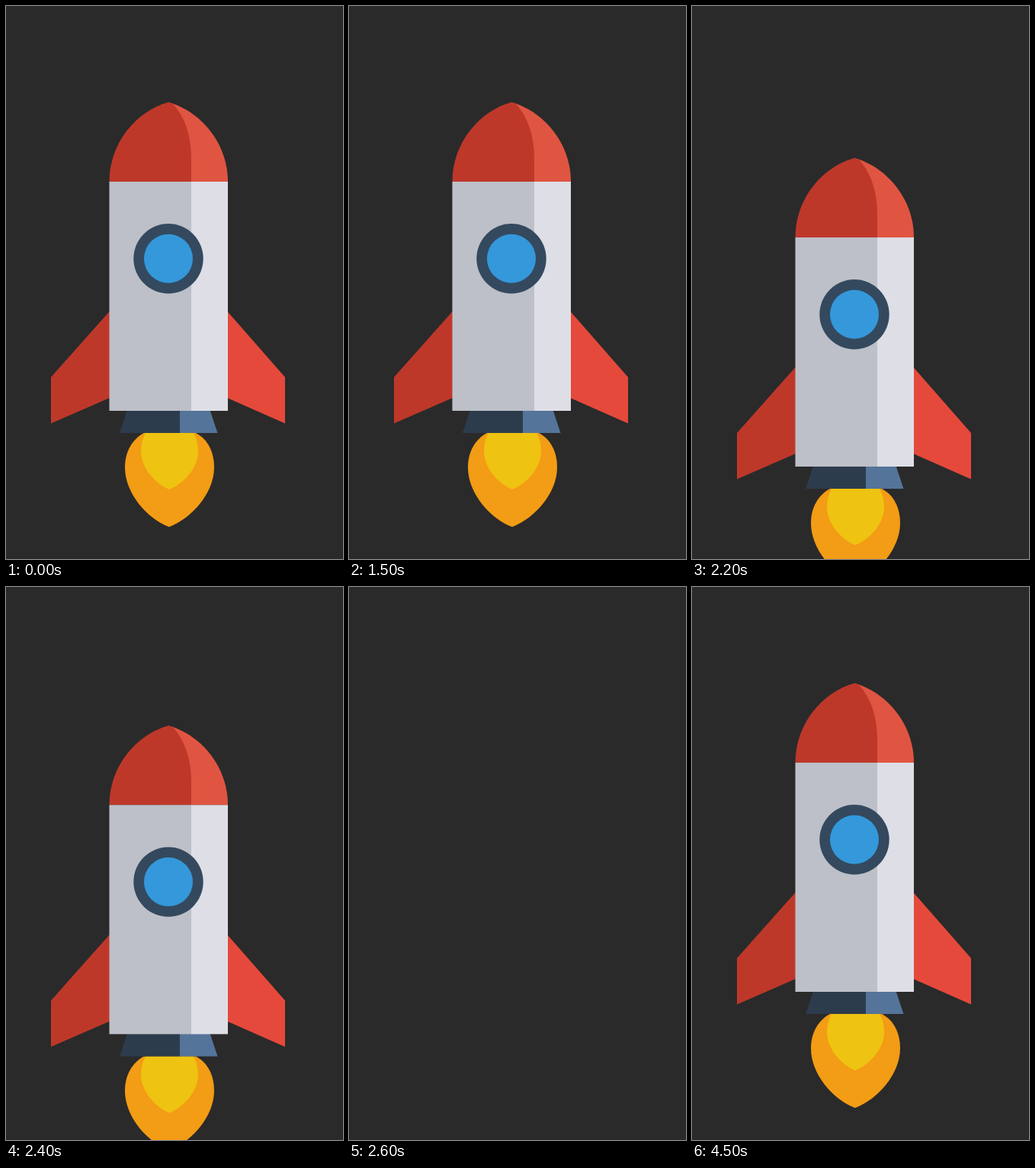
Write an HTML page that moves like this. It is 442 px wide and 724 px high and loops after 5.3 s.

```html
<!DOCTYPE html>
<html lang="en">
<head>
<meta charset="utf-8">
<title>Rocket launch</title>
<style>
  html, body { margin: 0; width: 100%; height: 100%; overflow: hidden; background: #2a2a2a; }
  svg { display: block; width: 100%; height: 100%; }
</style>
</head>
<body>
<svg viewBox="0 0 442 724">
  <rect width="442" height="724" fill="#2a2a2a"/>
  <rect y="720" width="442" height="4" fill="#2b292b"/>
  <g id="rocket">
    <g id="flame">
      <path fill="#f39c15" d="M181 559C166 567 156 583 156 604C156 638 185 671 214 682C243 671 273 638 273 604C273 583 264 567 249 559Z"/>
      <path fill="#efc311" d="M183 559C179 566 177 574 177 583C177 604 195 625 214 633C234 625 252 604 252 583C252 574 250 566 246 559Z"/>
    </g>
    <g id="nozzle">
      <path fill="#2d3c4c" d="M159 529H228V559H149Z"/>
      <path fill="#54749a" d="M228 529H267.500L277.500 559H228Z"/>
    </g>
    <g id="fins">
      <path fill="#be382a" d="M136 399.500L59 486V546.500L136 513Z"/>
      <path fill="#e5493b" d="M290 399.500L366 486V546.500L290 513Z"/>
    </g>
    <g id="nose">
      <path fill="#e05541" d="M213 126C256 138 291 180 291 230H200Z"/>
      <path fill="#be382a" d="M135.500 230C135.500 180 170 138 213 126L219 128C235 146 243 170 243 200V230Z"/>
    </g>
    <g id="body">
      <rect x="135.500" y="230" width="108" height="300" fill="#bdc0c8"/>
      <rect x="243" y="230" width="48" height="300" fill="#dedee6"/>
    </g>
    <circle cx="213" cy="330.700" r="45.700" fill="#34495e"/>
    <circle cx="213" cy="330.700" r="32" fill="#3498db"/>
  </g>
</svg>
<script>
  const LOOP = 5300, STEP = 100;
  const CROUCH = 1600, LIFT = 2200, GONE = 2600, RETURN = 3100;
  const DIP = 73;
  const rocket = document.getElementById('rocket');

  const easeInOut = p => (1 - Math.cos(Math.PI * p)) / 2;

  // Vertical offset: sink slowly, then shoot up exponentially.
  function offset(t) {
    if (t < CROUCH || t >= RETURN) return 0;
    if (t <= LIFT) return DIP * easeInOut((t - CROUCH) / (LIFT - CROUCH));
    return DIP - 17.6 * 10 ** ((t - 2400) / 100);
  }

  function draw(ms) {
    // The motion runs at ten pictures a second.
    const t = Math.floor((ms % LOOP) / STEP) * STEP;
    const hidden = t >= GONE && t < RETURN;
    rocket.setAttribute('visibility', hidden ? 'hidden' : 'visible');
    if (!hidden) rocket.setAttribute('transform', `translate(0 ${offset(t).toFixed(2)})`);
  }

  const start = performance.now();
  function tick() {
    draw(performance.now() - start);
    requestAnimationFrame(tick);
  }
  tick();
</script>
</body>
</html>
```
